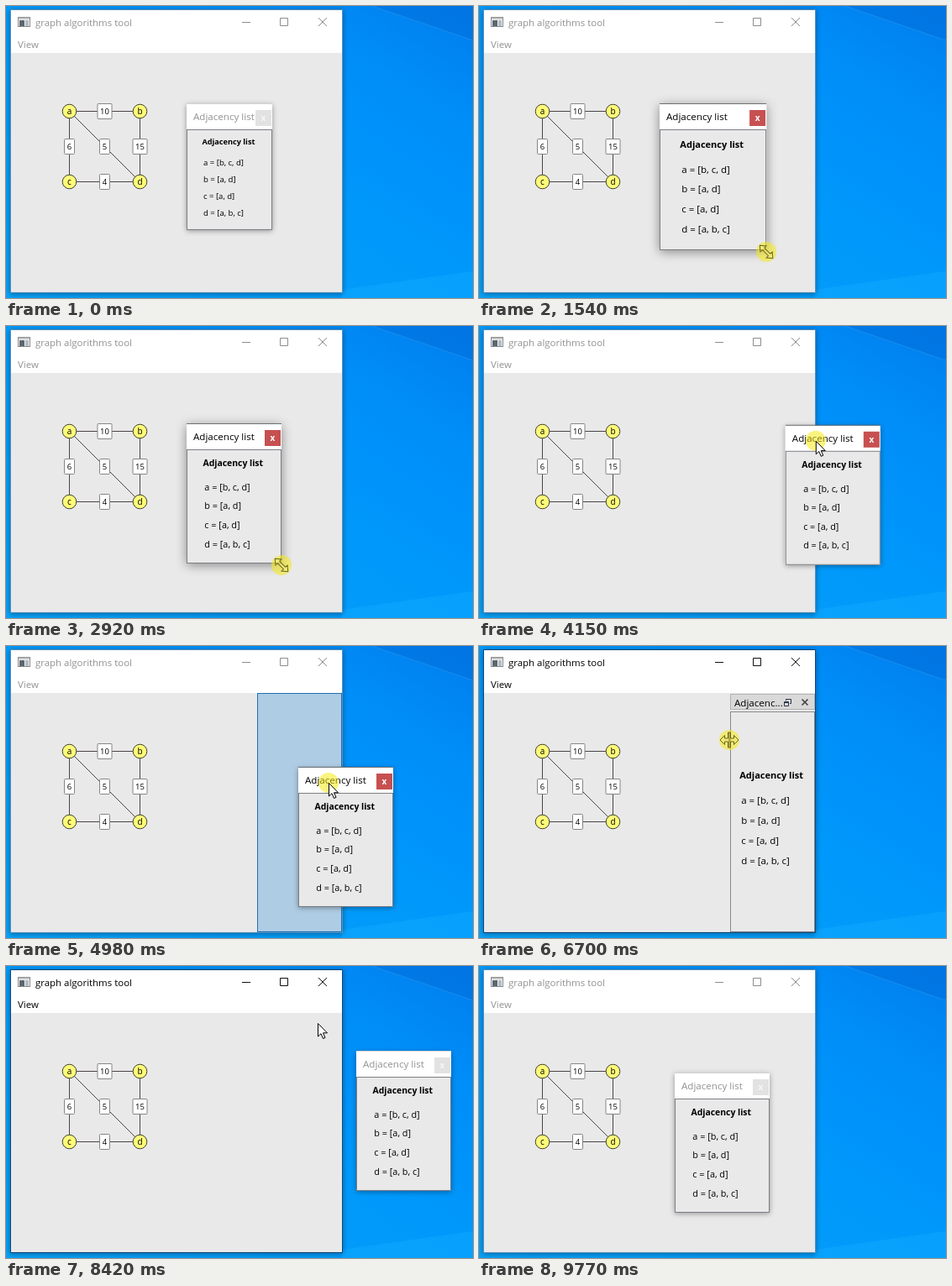
These frames come from a looping animation (556x348 px, 9820 ms). An HTML page:

```html
<!DOCTYPE html>
<html lang="en">
<head>
<meta charset="utf-8">
<title>Graph tool docking demo</title>
<style>
html, body { margin: 0; width: 100%; height: 100%; overflow: hidden; background: #0086e8; }
svg { display: block; width: 556px; height: 348px; }
text { font-family: "Open Sans", "Noto Sans", sans-serif; white-space: pre; }
</style>
</head>
<body>
<svg viewBox="0 0 556 348">
  <defs>
    <linearGradient id="sky" x1="0" y1="1" x2="1" y2="0">
      <stop offset="0" stop-color="#0aa0f6"/>
      <stop offset=".5" stop-color="#0099fb"/>
      <stop offset=".8" stop-color="#008df8"/>
      <stop offset="1" stop-color="#007dec"/>
    </linearGradient>
    <filter id="soft" x="-20%" y="-20%" width="140%" height="140%">
      <feDropShadow dx="0" dy="1" stdDeviation="3" flood-opacity=".38"/>
    </filter>
    <filter id="deep" x="-25%" y="-25%" width="150%" height="150%">
      <feDropShadow dx="0" dy="2" stdDeviation="6.5" flood-opacity=".43"/>
    </filter>
  </defs>
  <rect width="556" height="348" fill="url(#sky)"/>
  <path d="M436 0H556V41Z" fill="#0068d2" opacity=".4"/>
  <path d="M436 0L556 41" stroke="#2f9cf2" opacity=".5"/>
  <path d="M400 338L556 316V348H400Z" fill="#12acff" opacity=".4"/>
  <g id="stage"></g>
</svg>
<script>
const LOOP = 9820, STEP = 48;
const DOCK = 5300, UNDOCK = 8150;
const stage = document.getElementById('stage');

// Start, end and goal of each gesture. Without cx the button is held
// and the pointer follows whatever it moves.
const gestures = [
  [140, 1110, { cx: 317, cy: 269 }],
  [1300, 1960, { w: 171, h: 216 }],
  [2230, 2920, { w: 113, h: 166 }],
  [3070, 3400, { cx: 251, cy: 135 }],
  [3400, 3820, { x: 417, y: 102 }],
  [3960, 4600, { x: 243, y: 158 }],
  [4790, 4980, { x: 348, y: 145 }],
  [DOCK, DOCK, { x: 417, y: 102, cx: 377, cy: 163 }],
  [5630, 6560, { cx: 298, cy: 112 }],
  [6700, 7070, { split: 236 }],
  [7070, 7440, { split: 293 }],
  [7670, 8190, { cx: 371, cy: 68 }],
  [8420, 8600, { cx: 459, cy: 117 }],
  [8750, 9170, { x: 233, y: 128 }],
  [9310, 9540, { cx: 463, cy: 340 }]
];
const follow = { x: 'cx', w: 'cx', split: 'cx', y: 'cy', h: 'cy' };

function stateAt(t) {
  const s = { x: 215, y: 117, w: 102, h: 150, split: 299, cx: 424, cy: 325, goal: {} };
  for (const [a, b, goal] of gestures) {
    if (t < a) break;
    const p = t >= b ? 1 : Math.min(1, Math.floor((t - a) / STEP + .3) * STEP / (b - a));
    s.held = !('cx' in goal);
    s.goal = goal;
    for (const key in goal) {
      const d = (goal[key] - s[key]) * p;
      s[key] += d;
      if (s.held) s[follow[key]] += d;
    }
  }
  return s;
}

const within = (t, a, b) => t >= a && t < b;
const rect = (x, y, w, h, fill, more = '') =>
  `<rect x="${x}" y="${y}" width="${w}" height="${h}" fill="${fill}" ${more}/>`;
const path = (d, stroke, more = 'fill="none"') => `<path d="${d}" stroke="${stroke}" ${more}/>`;
const text = (s, x, y, px, fill = '#000', more = '') =>
  `<text x="${x}" y="${y}" font-size="${px}" fill="${fill}" ${more}>${s}</text>`;
const line = c => `stroke="${c}"`;
const mid = 'text-anchor="middle"', bold = 'font-weight="700"', medium = 'font-weight="500"';

function graph() {
  const nodes = { a: [75.5, 125.5], b: [159.5, 125.5], c: [75.5, 209.5], d: [159.5, 209.5] };
  const edges = { ab: 10, ac: 6, ad: 5, bd: 15, cd: 4 };
  let out = '';
  for (const [ends, cost] of Object.entries(edges)) {
    const [[x1, y1], [x2, y2]] = [...ends].map(n => nodes[n]);
    const x = (x1 + x2) / 2, y = (y1 + y2) / 2, w = cost > 9 ? 17 : 12;
    out += path(`M${x1} ${y1}L${x2} ${y2}`, '#4c4447') +
      rect(x - w / 2, y - 9, w, 18, '#fff', line('#858585') + ' rx="1"') +
      text(cost, x, y + 3.5, 9.5, '#000', `${mid} ${medium}`);
  }
  for (const [name, [x, y]] of Object.entries(nodes))
    out += `<circle cx="${x}" cy="${y}" r="8.3" fill="#fffc78" stroke="#3c3c30"/>` +
      text(name, x, y + 3.3, 10, '#000', `${mid} ${medium}`);
  return out;
}
const graphArt = graph();

function mainWindow(active) {
  const ink = active ? '#000' : '#929292', mark = active ? '#111' : '#8c8c8c';
  return `<g filter="url(#soft)">${rect(5.5, 4.5, 395, 337, '#e9e9e9', line(active ? '#174a78' : '#5c93bd'))}</g>` +
    rect(6, 5, 394, 51, '#fff') +
    rect(14.5, 13.5, 14, 11, '#f4f4f4', line('#8b8b8b')) + rect(15, 14, 13, 2, '#c3c7cb') +
    rect(16, 17, 6, 7, '#5b676f') + rect(23, 17, 4, 7, '#b5bcc2') +
    text('graph algorithms tool', 35, 24, 11.45, ink) +
    text('View', 14, 50, 11.45, ink) +
    path('M281 19.5H291M326.5 14.5H335.5V23.5H326.5ZM372 14L382 24M382 14L372 24', mark) +
    graphArt;
}

// Text block scaled to fit its view
function listing(x, y, w, h) {
  const u = Math.min(h * .00698, w * .0099), cx = x + w / 2, top = y + h / 2 - 55 * u;
  const rows = ['a = [b, c, d]', 'b = [a, d]', 'c = [a, d]', 'd = [a, b, c]'];
  return text('Adjacency list', cx - 1.3 * u, top + 4 * u, 11.05 * u, '#000', `${mid} ${bold}`) +
    rows.map((r, i) => text(r, cx - 37.3 * u, top + (34 + 24 * i) * u, 11.5 * u)).join('');
}

function floating({ x, y, w, h, goal }, active) {
  return `<g filter="url(#${'w' in goal ? 'deep' : 'soft'})">${rect(x, y, w, h, '#fff')}</g>` +
    path(`M${x} ${y - .5}h${w}`, active ? '#6d7076' : '#d4d4d4') +
    rect(x + .5, y + 30.5, w - 1, h - 31, '#e9e9e9', line('#7b7e84')) +
    text('Adjacency list', x + 8, y + 19, 11.6, active ? '#000' : '#929292') +
    rect(x + w - 20, y + 7, 19, 19, active ? '#c75050' : '#e2e2e2') +
    text('x', x + w - 10.5, y + 20, 10, active ? '#fff' : '#f6f6f6', `${mid} ${bold}`) +
    listing(x, y + 31, w, h - 31);
}

function docked({ split: x }) {
  const w = 400 - x;
  return rect(x + .5, 57.5, w - 1, 18, '#d9d9d9', line('#b3b3b3')) +
    text(w > 135 ? 'Adjacency list' : 'Adjacenc...', x + 5, 71.5, 11.6) +
    path('M365.5 65V63.5H371.5V68.5H370M363.5 66.5H368.5V71.5H363.5ZM363 67.5H369', '#2c3348') +
    path('M384.5 63.5L391.5 70.5M391.5 63.5L384.5 70.5', '#444', 'stroke-width="1.7"') +
    rect(x + .5, 78.5, w - 1, 262, '#e9e9e9', line('#858890')) +
    listing(x, 78, w, 262);
}

function cursor({ cx, cy, held, goal }) {
  const fill = `fill="${held ? 'none' : '#fff'}"`, ink = held ? '#6b661f' : '#000';
  let shape;
  if ('w' in goal)
    shape = `<g transform="rotate(45)">${path('M-11 0L-5-5V-1.7H5V-5L11 0L5 5V1.7H-5V5Z', ink, fill)}</g>`;
  else if ('split' in goal)
    shape = path('M-11 0L-5.5-5.5V-2H-1.5V-9H1.5V-2H5.5V-5.5L11 0L5.5 5.5V2H1.5V9H-1.5V2H-5.5V5.5ZM0-9V9', ink, fill);
  else
    shape = path('M.5.5V16L4 12.7L6.5 18.5L9 17.4L6.5 11.8H11.5Z', '#000', 'fill="#fff"');
  const glow = held ? '<circle r="12" fill="#f6ea14" opacity=".55"/>' : '';
  return `<g transform="translate(${cx} ${cy})">${glow}${shape}</g>`;
}

function draw(t) {
  const s = stateAt(t);
  const panelActive = within(t, 1060, DOCK) || within(t, 8750, 9770);
  const target = within(t, 4880, DOCK)
    ? rect(299.5, 56.5, 100, 284, '#aecce4', line('#1f6fb5')) : '';
  stage.innerHTML = mainWindow(within(t, DOCK, 8750)) + target +
    (within(t, DOCK, UNDOCK) ? docked(s) : floating(s, panelActive)) +
    (within(t, 140, 9540) ? cursor(s) : '');
}

const start = performance.now();
function tick() {
  draw((performance.now() - start) % LOOP);
  requestAnimationFrame(tick);
}
tick();
</script>
</body>
</html>
```
